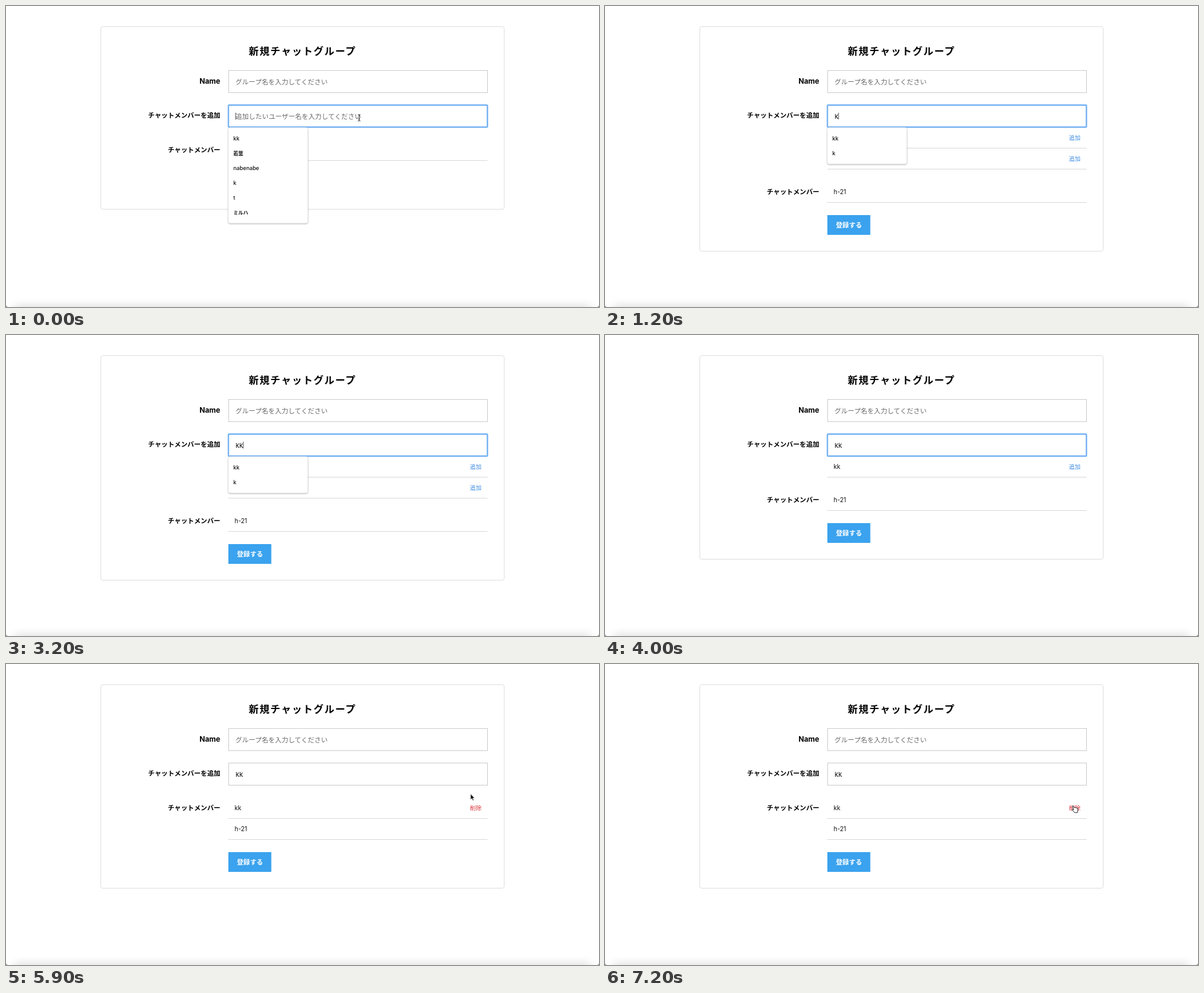
Write an HTML page that moves like this. It is 960x488 px and loops after 7.3 s.

```html
<!DOCTYPE html>
<html lang="ja">
<head>
<meta charset="utf-8">
<title>新規チャットグループ</title>
<style>
html, body { margin: 0; width: 100%; height: 100%; overflow: hidden; background: #fff; }
svg { display: block; width: 960px; height: 488px; }
text { font-family: Inter, "Noto Sans CJK JP", "Noto Sans CJK", sans-serif; }
.ja { font-family: "Noto Sans CJK JP", "Noto Sans CJK", sans-serif; }
</style>
</head>
<body>
<svg viewBox="0 0 960 488" xmlns="http://www.w3.org/2000/svg">
  <defs>
    <filter id="soft" x="-10%" y="-200%" width="120%" height="500%"><feGaussianBlur stdDeviation="8"/></filter>
    <filter id="drop" x="-10%" y="-10%" width="120%" height="125%">
      <feDropShadow dx="0" dy="1" stdDeviation="1" flood-color="#000" flood-opacity=".35"/>
    </filter>
    <g id="arrow">
      <path d="M0 0V9.6L2.2 7.6L3.7 11L5.3 10.3L3.9 7H6.8Z" fill="#111" stroke="#fff" stroke-width=".7"/>
    </g>
    <g id="hand">
      <path d="M-3.4-.2Q-2.6-1.2-1.7-.2L-.2 2.6L.8 2L2 2.6L3.2 2.3L4 3.3L5.2 3.8L5.6 6.4L5 8.6V10.4H.2L-3.4 6.4Q-4 4.9-2.7 5.2L-1.3 6Z"
        fill="#fff" stroke="#111" stroke-width=".9" stroke-linejoin="round"/>
    </g>
    <g id="beam">
      <path d="M-2-5Q0-5 0-3.8Q0-5 2-5M0-4V4.5M-2 5.5Q0 5.5 0 4.3Q0 5.5 2 5.5M-1.2 2H1.2" fill="none" stroke="#111" stroke-width=".9"/>
    </g>
  </defs>
  <g id="page"></g>
  <rect x="14" y="487" width="932" height="40" fill="#000" opacity=".16" filter="url(#soft)"/>
  <path d="M0 485Q.3 487.7 3 488H0ZM960 485Q959.7 487.7 957 488H960Z" fill="#888"/>
</svg>
<script>
const LOOP = 7300, STEP = 100;
const TYPE_1 = 1000, FOUND_1 = 1100, TYPE_2 = 3200, FOUND_2 = 3300, ADDED = 5800;
const HISTORY = ['kk', '若葉', 'nabenabe', 'k', 't', 'ミルハ'];
const ME = 'h-21';
const page = document.getElementById('page');

// y is the optical middle of the line
function text(str, x, y, size, opt = {}) {
  const { fill = '#111', weight = 400, anchor = 'start', space = 0 } = opt;
  const cls = /[^\x00-\x7f]/.test(str) ? 'class="ja"' : '';
  return `<text ${cls} x="${x}" y="${y + size * 0.38}" font-size="${size}" font-weight="${weight}" ` +
    `fill="${fill}" text-anchor="${anchor}" letter-spacing="${space}">${str}</text>`;
}

const box = (x, y, w, h, attrs) => `<rect x="${x}" y="${y}" width="${w}" height="${h}" ${attrs}/>`;
const label = (str, y, size = 10.64) => text(str, 346.9, y, size, { fill: '#000', weight: 700, anchor: 'end' });
const hint = (str, y) => text(str, 371.5, y, 10.67, { fill: '#666', space: .1 });

function row(name, y, action, color) {
  return text(name, 370, y, 10) +
    (action ? text(action, 751, y, 9.4, { fill: color }) : '') +
    `<path d="M360 ${y + 17.5}H779.5" stroke="#d9d9d9"/>`;
}

function field(y, focused) {
  return focused
    ? box(360, y, 419.5, 36, 'rx="1.5" fill="#fff" stroke="#b9d8fa" stroke-width="2.8"') +
      box(360.2, y + .2, 419.1, 35.6, 'rx="1" fill="none" stroke="#68abf2" stroke-width="1.5"')
    : box(360.5, y, 419, 36, 'fill="#fff" stroke="#ccc"');
}

function menu(items) {
  return box(360, 197, 128.5, 11 + 24 * items.length, 'rx="3" fill="#fff" stroke="#ddd" stroke-width=".5" filter="url(#drop)"') +
    items.map((s, i) => text(s, 368, 215 + 24 * i, /^\w/.test(s) ? 8.8 : 8, { weight: /^\w/.test(s) ? 500 : 700 })).join('');
}

// the caret blinks every half second and restarts with each key
function caretOn(t) {
  if (t >= ADDED) return false;
  if (t < TYPE_1) return t < 400 || t >= 900;
  if (t < TYPE_2) return (t - TYPE_1) % 1000 < 500;
  return t < TYPE_2 + 500 || (t - TYPE_2 - 100) % 1000 < 500;
}

// [time, x, y]
const PATH = [
  [5000, 600, 186], [5100, 738, 216], [5200, 809, 229], [5300, 809, 227],
  [5600, 753, 211], [5900, 752, 210.5], [6000, 752, 211], [6400, 760, 230.5], [LOOP, 760, 230.5]
];

function pointer(t) {
  if (t < TYPE_1) return '<use href="#beam" x="571.7" y="181"/>';
  if (t < PATH[0][0]) return '';
  const i = PATH.findIndex(p => t < p[0]);
  const [t0, x0, y0] = PATH[i - 1], [t1, x1, y1] = PATH[i];
  const k = (t - t0) / (t1 - t0), e = k * k * (3 - 2 * k);
  const x = x0 + (x1 - x0) * e, y = y0 + (y1 - y0) * e;
  const linkY = t < ADDED ? 213 : 233;
  const overLink = x > 750 && x < 771 && Math.abs(y - linkY) < 7;
  const overField = x < 779 && y > 161 && y < 197;
  return `<use href="#${overLink ? 'hand' : overField ? 'beam' : 'arrow'}" x="${x}" y="${y}"/>`;
}

function draw(t) {
  const typed = t < TYPE_1 ? '' : t < TYPE_2 ? 'k' : 'kk';
  const query = t < FOUND_1 ? '' : t < FOUND_2 ? 'k' : 'kk';
  const results = !query || t >= ADDED ? [] : ['kk', 'k'].filter(s => s.startsWith(query));
  const members = t < ADDED ? [ME] : ['kk', ME];
  const focused = t < ADDED;
  const top = 233 + 34 * results.length;
  const last = top + 34 * (members.length - 1);

  let out = box(153.5, 33.5, 653, last + 63, 'rx="3" fill="#fff" stroke="#dedede"');
  out += text('新規チャットグループ', 393, 72.5, 16, { fill: '#000', weight: 700, space: 1.52 });
  out += label('Name', 121.2, 11.8) + label('チャットメンバーを追加', 177.3) + label('チャットメンバー', top);
  out += field(104.5, false) + hint('グループ名を入力してください', 122.5);
  out += field(160.5, focused);
  out += typed
    ? text(typed, 371.7, 178.8, 11)
    : hint('追加したいユーザー名を入力してください', 178.5);
  if (caretOn(t)) out += box(371.5 + 6.1 * typed.length, 173, .8, 11, 'fill="#222"');

  results.forEach((s, i) => out += row(s, 213 + 34 * i, '追加', '#3f8de4'));
  members.forEach((s, i) => out += row(s, top + 34 * i, s === ME ? '' : '削除', '#d9363e'));
  out += box(360, last + 38, 69.5, 32, 'fill="#3aa2ee"');
  out += text('登録する', 373.7, last + 54, 10.64, { fill: '#fff', weight: 700 });

  // suggestions follow the last answered query
  if (t < FOUND_2) out += menu(HISTORY.filter(s => s.startsWith(query)));
  page.innerHTML = out + pointer(t);
}

const start = performance.now();
let shown = -1;
function tick() {
  const t = Math.floor(((performance.now() - start) % LOOP) / STEP) * STEP;
  if (t !== shown) draw(shown = t);
  requestAnimationFrame(tick);
}
tick();
</script>
</body>
</html>
```
